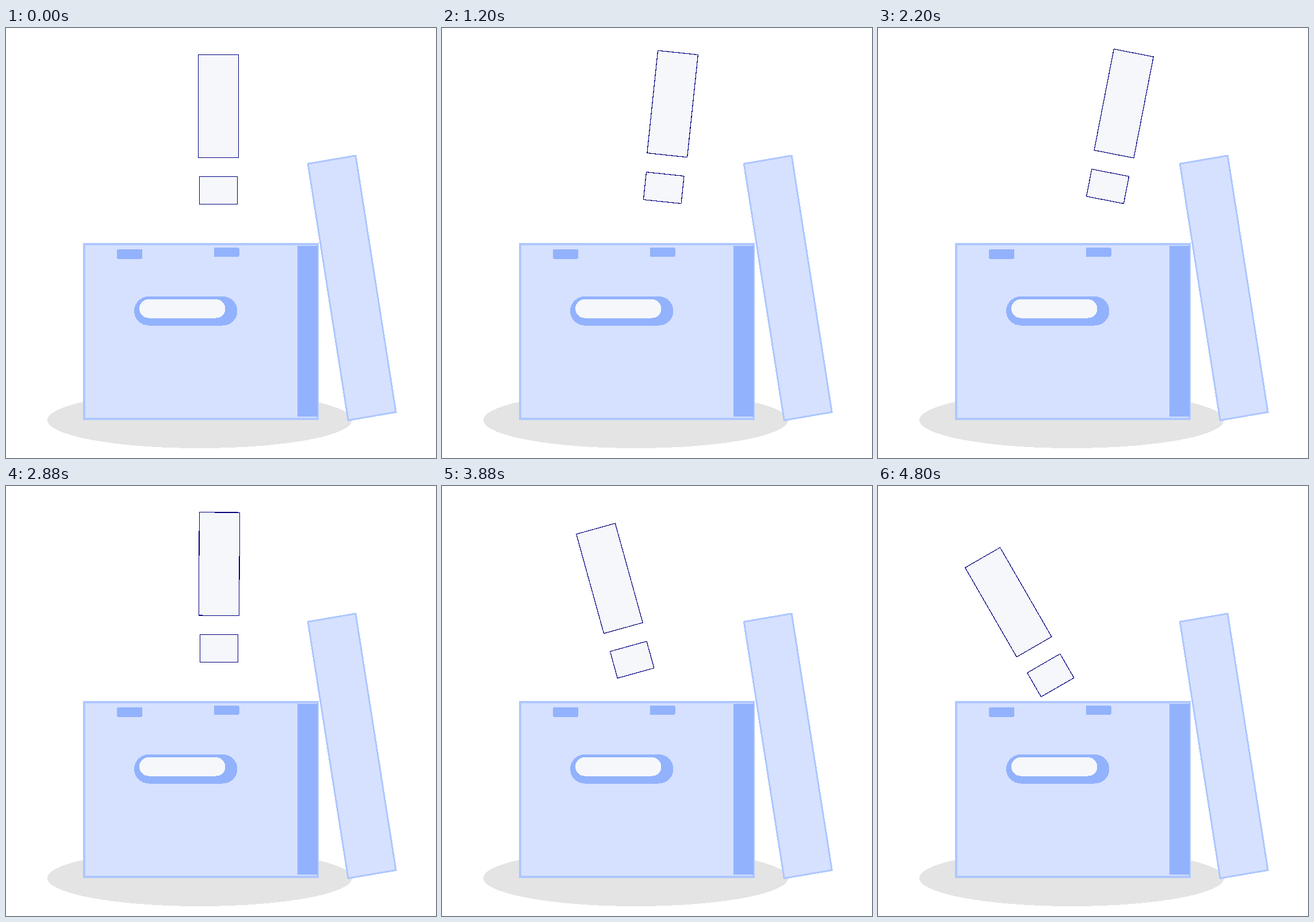
These frames come from a looping animation (748x748 px, 5000 ms). An HTML page:

```html
<!DOCTYPE html>
<html lang="en">
<head>
<meta charset="utf-8">
<title>Open box</title>
<style>
  html, body { margin: 0; width: 100%; height: 100%; overflow: hidden; background: #fff; }
  svg { display: block; width: 100%; height: 100%; }
  .card { fill: #d6e1ff; stroke: #aec7ff; stroke-linejoin: round; }
  .shade { fill: #92b2fd; }
  .pale { fill: #f5f7fb; }
  #mark { stroke: #00007d; stroke-width: 1.2; }
</style>
</head>
<body>
<svg viewBox="0 0 748 748" shape-rendering="crispEdges">
  <ellipse cx="337" cy="682" rx="265" ry="49" fill="#e4e4e4"/>
  <path class="card" stroke-width="3" d="M525.3 236.2 L608.2 222 L678.2 668.2 L595.3 682.4 Z"/>
  <rect class="card" stroke-width="4" x="135.8" y="376" width="406.4" height="304"/>
  <rect class="shade" x="507" y="379" width="34.5" height="297"/>
  <rect class="shade" x="193" y="385" width="44" height="16.5" rx="2"/>
  <rect class="shade" x="362" y="381.5" width="43.5" height="16.5" rx="2"/>
  <rect class="shade" x="223" y="467" width="179.5" height="50.5" rx="25.2"/>
  <rect class="pale" x="232" y="472" width="149.5" height="32.5" rx="16.2"/>
  <g id="mark" class="pale">
    <rect x="334.4" y="46.2" width="70.2" height="179.3"/>
    <rect x="336.5" y="258.6" width="66" height="48.2" rx="0.8"/>
  </g>
</svg>
<script>
  const LOOP = 5000, STEP = 40;
  const PIVOT = "421.9 435.3";
  const PEAK = { t: 2200, deg: 11 };
  const END = { t: 4800, deg: -30 };
  const mark = document.getElementById("mark");

  // Slow lean to the right, quicker swing to the left, then a short hold.
  function angle(t) {
    if (t <= PEAK.t) return PEAK.deg * t / PEAK.t;
    const k = Math.min(1, (t - PEAK.t) / (END.t - PEAK.t));
    return PEAK.deg + (END.deg - PEAK.deg) * k;
  }

  function draw(ms) {
    const t = Math.floor((ms % LOOP) / STEP) * STEP;
    mark.setAttribute("transform", `rotate(${angle(t)} ${PIVOT})`);
  }

  let start = null;
  function tick(now) {
    if (start === null) start = now;
    draw(now - start);
    requestAnimationFrame(tick);
  }
  draw(0);
  requestAnimationFrame(tick);
</script>
</body>
</html>
```
